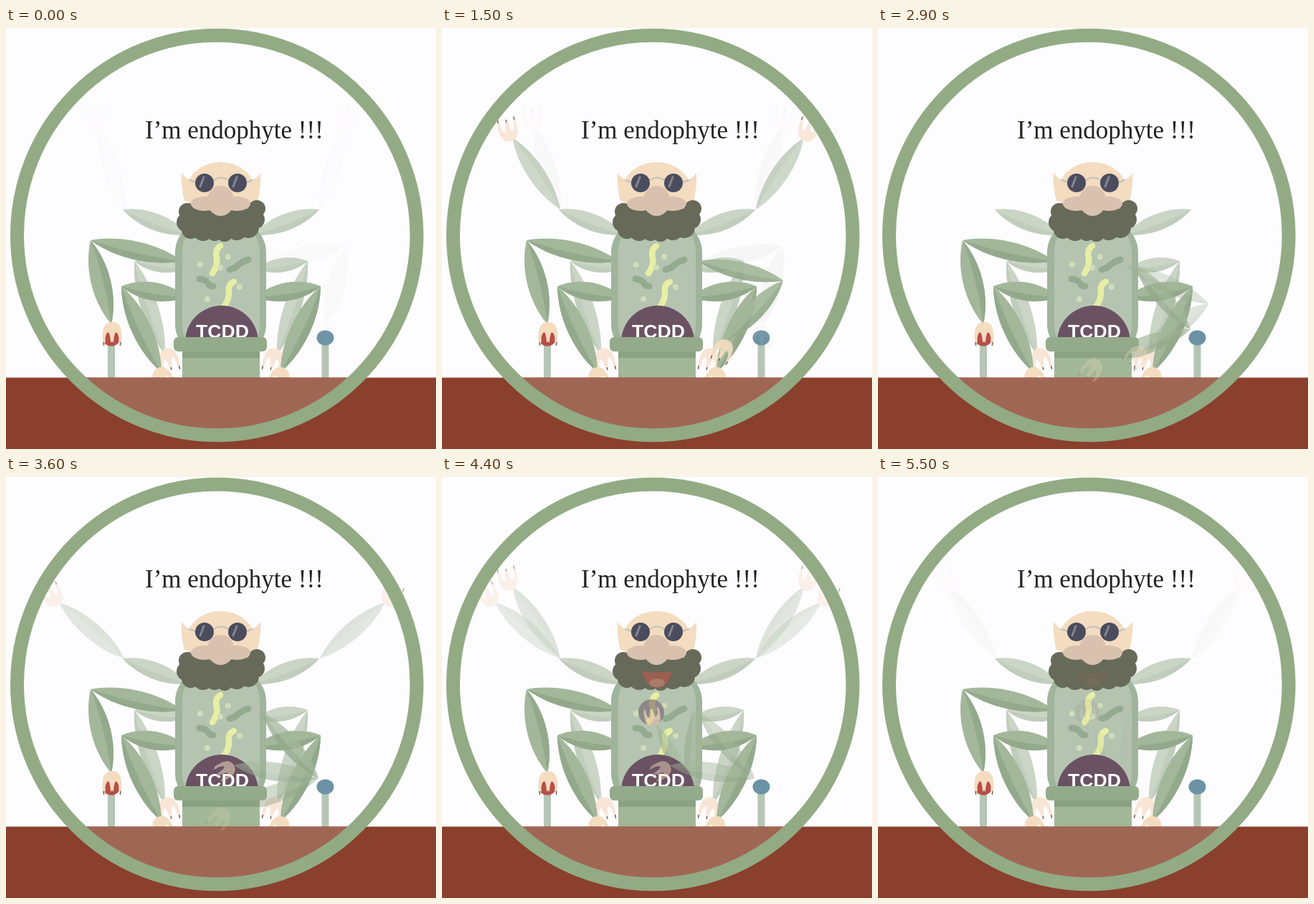
An HTML page that plays this animation: 600 px wide and 587 px high, repeating every 5.6 s.

```html
<!DOCTYPE html>
<html lang="en">
<head>
<meta charset="utf-8">
<title>Endophyte</title>
<style>
  html, body { margin: 0; width: 100%; height: 100%; overflow: hidden; background: #fdfcfe; }
  svg { display: block; width: 100%; height: 100%; }
</style>
</head>
<body>
<svg id="stage" viewBox="0 0 600 587"></svg>
<script>
const STEP = 800, FRAME = 100, LOOP = 5600, LEAD = 32;
const GREEN = ['#a3b79a', '#93a98b'], PALE = ['#cad5c6', '#c1cdbc'];
const SKIN = '#f3dcbf', PALE_SKIN = '#f8e5d6', MUZZLE = '#d9c1af', BEARD = '#686a59', PURPLE = '#6a5263';

const group = (content, attrs = '') => `<g ${attrs}>${content}</g>`;
const path = (d, fill, attrs = '') => `<path d="${d}" fill="${fill}" ${attrs}/>`;
const stroke = (d, color, width) =>
  path(d, 'none', `stroke="${color}" stroke-width="${width}" stroke-linecap="round" stroke-linejoin="round"`);
const oval = (x, y, rx, ry, fill) => `<ellipse cx="${x}" cy="${y}" rx="${rx}" ry="${ry}" fill="${fill}"/>`;
const dot = (x, y, r, fill) => oval(x, y, r, r, fill);
const box = (x, y, w, h, fill, r = 0) =>
  `<rect x="${x}" y="${y}" width="${w}" height="${h}" rx="${r}" fill="${fill}"/>`;
const mirror = (content, sum = 600) => group(content, `transform="matrix(-1 0 0 1 ${sum} 0)"`);
const pair = (content, sum) => content + mirror(content, sum);

// Pointed leaf between two points; the sign of the width picks the shaded edge.
function leaf(x1, y1, x2, y2, width, [light, shade]) {
  const length = Math.hypot(x2 - x1, y2 - y1);
  const angle = Math.atan2(y2 - y1, x2 - x1) * 180 / Math.PI;
  const near = length * .3, far = length * .7, bulge = width * 1.3;
  const shape = inner =>
    `M0 0C${near} ${bulge} ${far} ${bulge} ${length} 0C${far} ${inner} ${near} ${inner} 0 0Z`;
  return group(path(shape(-bulge), light) + path(shape(bulge * .25), shade),
    `transform="translate(${x1} ${y1}) rotate(${angle})"`);
}

// Clawed hand hanging down from its wrist before rotation.
function hand(x, y, angle, skin = SKIN, scale = .95) {
  const half = path('M0 0C10 0 14 8 14 18Q15 26 12 33Q9 31 10 24Q9 15 5 15Q2.5 20 2 30H-1V0Z', skin) +
    stroke('M12.5 30L12 34', '#6b5a50', 1.5);
  return group(pair(half, 0) + stroke('M0 29V32', '#6b5a50', 1.5),
    `transform="translate(${x} ${y}) rotate(${angle}) scale(${scale})"`);
}

function arm(shoulder, elbow, wrist, angle, scale) {
  return leaf(...shoulder, ...elbow, 12, GREEN) + leaf(...elbow, ...wrist, -13, GREEN) +
    hand(...wrist, angle, SKIN, scale);
}

const raised = (x, y, angle) =>
  pair(leaf(x + 2, y - 5, 165, 253, -12, PALE) + hand(x, y, angle, PALE_SKIN), 603);

const pose = (index, content) => group(content, `data-pose="${index}" opacity="0"`);

const knob = (x, y, color) => box(x - 5, y, 10, 488 - y, '#b5c6b4') + oval(x, y, 12, 10.5, color);

const legs = pair(
  leaf(163, 253, 255, 288, 12, PALE) +
  leaf(179, 325, 250, 336, 10, PALE) +
  leaf(179, 325, 222, 455, 12, PALE) +
  hand(223, 447, -15, PALE_SKIN) +
  leaf(161, 360, 252, 375, 13, GREEN) +
  leaf(161, 360, 217, 480, 14, GREEN) +
  hand(212, 474, -25));

const leftArm = leaf(118, 296, 246, 325, 13, GREEN) + leaf(118, 296, 147, 413, -14, GREEN) + hand(148, 410, 0);

const body =
  box(236, 268, 127, 190, '#a0b49b', 45) +
  box(246, 272, 108, 182, '#b5c4b1', 38) +
  stroke('M312 337L320 334Q326 327 338 323', '#94ab90', 9) +
  stroke('M270 350Q280 350 284 359L289 360', '#94ab90', 9) +
  stroke('M299 304Q291 309 294 321Q296 331 288 342', '#e7eea5', 8.5) +
  stroke('M318 354Q310 357 311 367Q312 379 303 390', '#e7eea5', 8.5) +
  [[271, 330], [310, 319], [281, 378], [326, 361], [299, 334]].map(([x, y]) => dot(x, y, 4, '#d0ddba')).join('');

const beard = [[253, 256, 12], [251, 271, 13], [258, 281, 13], [275, 283, 14], [291, 286, 11],
  [305, 287, 11], [322, 282, 14], [338, 278, 15], [348, 267, 13], [350, 252, 12]]
  .map(([x, y, r]) => dot(x, y, r, BEARD)).join('') + oval(300, 267, 52, 22, BEARD);

const lens = x => dot(x, 216, 13, '#4b4c5e') + stroke(`M${x - 6} 221L${x - 1} 208`, '#85868f', 3);

const head =
  pair(path('M245 202Q251 211 259 213V243L249 241Q244 222 245 202Z', SKIN)) +
  oval(299.5, 228, 48, 41, SKIN) +
  beard +
  oval(277, 245, 19, 10, MUZZLE) + oval(322, 245, 19, 10, MUZZLE) + oval(299.5, 241, 19, 21, MUZZLE) +
  stroke('M290 212Q300 205 310 212M256 212L264 215M344 212L336 215', '#bdc1bd', 2) +
  lens(277) + lens(323);

const pot =
  dot(301, 438, 51, PURPLE) +
  `<text x="265" y="432" font-family="'Liberation Sans', Arial, sans-serif" font-weight="bold" font-size="26.6" fill="#fff">TCDD</text>` +
  box(246, 445, 108, 43, '#a2b798') + box(246, 451, 108, 9, '#8ba283') +
  box(234, 431, 130, 20, '#94ab8b', 6);

const mouth = path('M279 271Q300 274 321 271Q316 293 300 294Q284 293 279 271Z', '#c9574b') +
  oval(300, 287, 11, 6, '#df8a7b');

const feeding = raised(96, 158, 167) + mouth +
  leaf(352, 325, 348, 445, 12, GREEN) + leaf(348, 445, 300, 345, -10, GREEN) +
  dot(292, 328, 18, PURPLE) + hand(296, 347, 170, '#dcb9a2', .8);

const floor = box(0, 487.5, 600, 100, '#8a402c') +
  `<clipPath id="ground"><rect y="487.5" width="600" height="100"/></clipPath>` +
  group(dot(294.5, 289, 279, '#a06654'), 'clip-path="url(#ground)"');

const title = `<text x="194" y="154" font-family="'Liberation Serif', 'Times New Roman', serif" font-size="35" fill="#242326">I’m endophyte !!!</text>`;

const stage = document.getElementById('stage');
stage.innerHTML =
  knob(147, 433, '#b94e47') + knob(445.5, 432, '#6b93a5') +
  legs + leftArm + body + head +
  pose(4, arm([358, 330], [436, 420], [312, 464], 48)) +
  pose(6, feeding) +
  pot + floor +
  pose(1, raised(127, 143, 176) + arm([354, 330], [475, 304], [446, 414], 0)) +
  pose(2, raised(96, 158, 167) + arm([358, 325], [476, 352], [398, 435], 22)) +
  pose(3, arm([345, 330], [461, 384], [372, 447], 45)) +
  pose(4, group(hand(308, 463, 35), 'opacity=".4"')) +
  pose(5, raised(72, 180, 155) + arm([358, 328], [436, 420], [318, 402], 60, .85)) +
  `<circle cx="294.3" cy="289" r="278.8" fill="none" stroke="#92ab84" stroke-width="19"/>` +
  title;

const poses = [...stage.querySelectorAll('[data-pose]')];

// Each pose dissolves in over one step and out over the next.
function draw(now) {
  const time = Math.floor(now % LOOP / FRAME) * FRAME;
  const phase = (time + LEAD) / STEP;
  for (const item of poses) {
    item.setAttribute('opacity', Math.max(0, 1 - Math.abs(phase - item.dataset.pose)));
  }
}

const start = performance.now();
function tick() {
  draw(performance.now() - start);
  requestAnimationFrame(tick);
}
tick();
</script>
</body>
</html>
```
